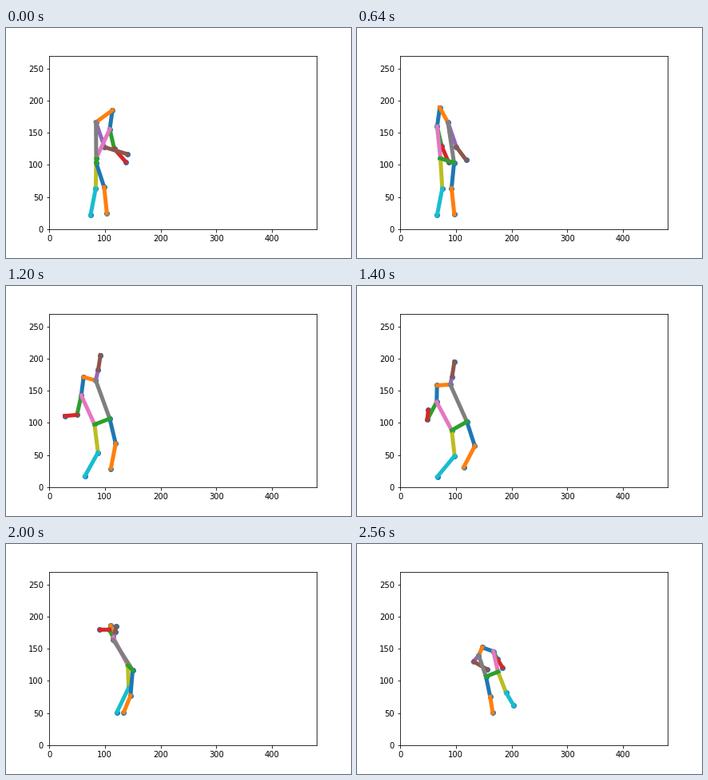
Animation, 432 px wide and 288 px high, one loop 2.6 s. Source, as a matplotlib script:

```python
import numpy as np
import matplotlib.pyplot as plt
from matplotlib.animation import FuncAnimation

FRAMES, INTERVAL = 65, 40
WIDTH, HEIGHT, DPI = 432, 288, 72
X_MAX, Y_MAX = 480, 270
LEFT, RIGHT, BOTTOM, TOP = 0.125, 0.9, 0.125, 0.88
T = np.arange(FRAMES)

BONES = [
    ("head", "l_shoulder"), ("head", "r_shoulder"),
    ("l_shoulder", "l_elbow"), ("l_elbow", "l_wrist"),
    ("r_shoulder", "r_elbow"), ("r_elbow", "r_wrist"),
    ("l_shoulder", "l_hip"), ("r_shoulder", "r_hip"),
    ("l_hip", "l_knee"), ("l_knee", "l_ankle"),
    ("r_hip", "r_knee"), ("r_knee", "r_ankle"),
    ("l_hip", "r_hip"),
]


def moves(start, *steps):
    """A value over all frames: each step eases in an amount between two frames."""
    value = np.full(FRAMES, float(start))
    for amount, begin, end in steps:
        u = np.clip((T - begin) / (end - begin), 0, 1)
        value += amount * u * u * (3 - 2 * u)
    return value


def wave(period):
    return np.cos(2 * np.pi * T / period)


def limb(origin, length, angle):
    """Far end of a bone; 0 degrees hangs down, positive turns right."""
    a = np.radians(angle)
    return origin + (length * np.array([np.sin(a), np.cos(a)])).T


def body():
    """Every joint's path in stage pixels, measured from the top left."""
    # Pelvis: strides right while the hips turn.
    hips = np.column_stack([
        moves(113, (56, 20, 64)),
        moves(166, (10, 25, 37), (-21, 40, 50), (8, 50, 62))])
    turn = np.column_stack([
        moves(0, (19, 0, 20), (-35, 38, 67)),
        moves(6, (-17, 14, 37), (17, 37, 50))])
    j = {"l_hip": hips - turn / 2, "r_hip": hips + turn / 2}

    # Trunk and head lean back, then fold forward.
    j["l_shoulder"] = limb(j["l_hip"], -moves(40, (-14, 48, 64)),
                           -25 + 55 * np.sin(np.pi * T / 84))
    j["r_shoulder"] = limb(j["r_hip"], -moves(51, (-23, 43, 64)),
                           moves(0, (35, -4, 58), (-16, 48, 62)))
    j["head"] = limb(j["l_shoulder"], -moves(24, (-9, 25, 50)),
                     moves(-8, (20, 28, 46), (58, 49, 64)))

    # Arms: both fold up, then the right one whips round.
    j["l_elbow"] = limb(j["l_shoulder"], moves(25, (-14, 38, 50)),
                        moves(13, (-54, 18, 43), (-112, 43, 50), (180, 50, 64)))
    j["l_wrist"] = limb(j["l_elbow"], moves(22, (-10, 22, 35)),
                        moves(41, (-25, 0, 25), (-202, 25, 35), (218, 38, 64)))
    j["r_elbow"] = limb(j["r_shoulder"], moves(33, (-23, 14, 35)),
                        moves(19, (148, 16, 29), (153, 50, 64)))
    j["r_wrist"] = limb(j["r_elbow"],
                        moves(30, (-11, 0, 20), (-12, 35, 50), (13, 50, 64)),
                        moves(73, (-36, 0, 16), (134, 16, 30), (249, 50, 64)))

    # Legs: thighs sway, shins kick back and return.
    j["l_knee"] = limb(j["l_hip"], moves(38, (-10, 22, 46)),
                       moves(3, (22, 48, 64)) - 4 * wave(60))
    j["l_ankle"] = limb(j["l_knee"], moves(34, (-15, 50, 64)),
                        moves(-11, (-31, 20, 38), (74, 43, 66)))
    j["r_knee"] = limb(j["r_hip"], moves(32, (-6, 50, 64)), 6 + 12 * wave(35))
    j["r_ankle"] = limb(j["r_knee"], moves(33, (-13, 24, 60)),
                        moves(6, (-44, 22, 41), (47, 41, 64)))
    return j


def to_data(points):
    """Convert stage pixels to axes coordinates."""
    x, y = points.T
    return np.column_stack([
        (x / WIDTH - LEFT) / (RIGHT - LEFT) * X_MAX,
        (1 - y / HEIGHT - BOTTOM) / (TOP - BOTTOM) * Y_MAX])


paths = {name: to_data(points) for name, points in body().items()}

plt.rcParams.update({"font.family": "DejaVu Sans", "font.size": 10})
fig = plt.figure(figsize=(WIDTH / DPI, HEIGHT / DPI), dpi=DPI, facecolor="white")
ax = fig.add_axes([LEFT, BOTTOM, RIGHT - LEFT, TOP - BOTTOM])
ax.set(xlim=(0, X_MAX), ylim=(0, Y_MAX),
       xticks=range(0, 401, 100), yticks=range(0, 251, 50))

dots = ax.scatter([0] * len(paths), [0] * len(paths), color="C0")
lines = [ax.plot([], [], color=f"C{k % 10}", lw=5)[0] for k in range(len(BONES))]


def draw(frame):
    dots.set_offsets([p[frame] for p in paths.values()])
    for line, (a, b) in zip(lines, BONES):
        line.set_data(*zip(paths[a][frame], paths[b][frame]))
    return [dots, *lines]


anim = FuncAnimation(fig, draw, frames=FRAMES, interval=INTERVAL,
                     repeat=True, repeat_delay=0, blit=False)
plt.show()
```
